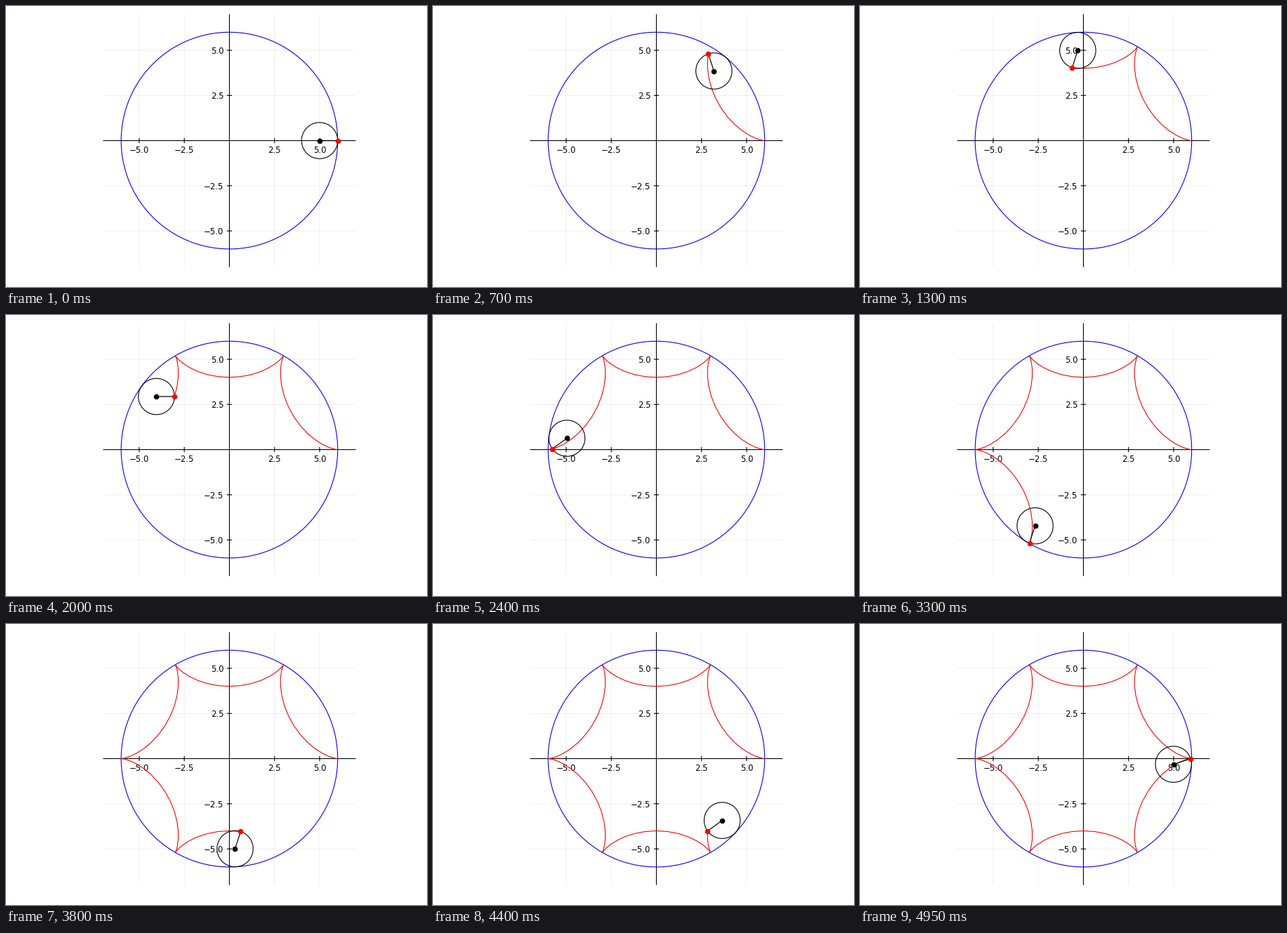
Write a matplotlib script that moves like this. It is 600x400 px and loops after 5 s.

```python
import numpy as np
import matplotlib.pyplot as plt
from matplotlib.animation import FuncAnimation

FRAMES, INTERVAL = 100, 50
W, H, DPI = 600, 400, 100
PX = 72 / DPI                 # points per pixel
R, r, LIM = 6, 1, 7           # fixed circle, rolling circle, half view
CX, CY, SIDE = 318.4, 191.6, 360
UNIT = SIDE / (2 * LIM)       # pixels per data unit

plt.rcParams["font.family"] = "DejaVu Sans"
plt.rcParams["path.simplify"] = False

fig = plt.figure(figsize=(W / DPI, H / DPI), dpi=DPI, facecolor="white")
ax = fig.add_axes([(CX - SIDE / 2) / W, 1 - (CY + SIDE / 2) / H, SIDE / W, SIDE / H])
ax.set_xlim(-LIM, LIM)
ax.set_ylim(-LIM, LIM)
ax.axis("off")


def line(x, y, color="black", width=1.1, z=3, **kw):
    return ax.plot(x, y, color=color, lw=width * PX, zorder=z, clip_on=False,
                   snap=False, solid_capstyle="butt", **kw)[0]


def dot(color, z):
    return ax.plot([], [], "o", color=color, ms=7.6 * PX, mew=0, zorder=z,
                   clip_on=False, snap=False)[0]


def label(x, y, value, **kw):
    text = f"{value:.1f}".replace("-", "\u2212")
    ax.text(x, y, text, fontsize=11.6 * PX, color="black", zorder=2, **kw)


# Grid, axes through the origin, ticks and labels
tick = 3.6 / UNIT
for v in (-5, -2.5, 2.5, 5):
    line([v, v], [-LIM, LIM], width=0.6, z=0, alpha=0.1)
    line([-LIM, LIM], [v, v], width=0.6, z=0, alpha=0.1)
    line([v, v], [-tick, tick], z=1)
    line([-tick, tick], [v, v], z=1)
    label(v, -11.9 / UNIT, v, ha="center", va="center_baseline")
    label(-8 / UNIT, v, v, ha="right", va="center_baseline")
line([-LIM, LIM], [0, 0], z=1)
line([0, 0], [-LIM, LIM], z=1)

phi = np.linspace(0, 2 * np.pi, 201)
ring_x, ring_y = np.cos(phi), np.sin(phi)
line(R * ring_x, R * ring_y, "blue")

# Hypocycloid sampled once per frame
t = 2 * np.pi * np.arange(FRAMES) / FRAMES
hub_x, hub_y = (R - r) * np.cos(t), (R - r) * np.sin(t)
spin = (R - r) / r * t
pen_x, pen_y = hub_x + r * np.cos(spin), hub_y - r * np.sin(spin)

trace = line([], [], "red", z=4)
wheel = line([], [], z=5)
arm = line([], [], z=6, width=1.2)
hub = dot("black", 7)
pen = dot("red", 8)


def update(k):
    trace.set_data(pen_x[:k + 1], pen_y[:k + 1])
    wheel.set_data(hub_x[k] + r * ring_x, hub_y[k] + r * ring_y)
    arm.set_data([hub_x[k], pen_x[k]], [hub_y[k], pen_y[k]])
    hub.set_data([hub_x[k]], [hub_y[k]])
    pen.set_data([pen_x[k]], [pen_y[k]])
    return trace, wheel, arm, hub, pen


anim = FuncAnimation(fig, update, frames=FRAMES, interval=INTERVAL,
                     init_func=lambda: update(0), repeat=True, repeat_delay=0)
plt.show()
```
